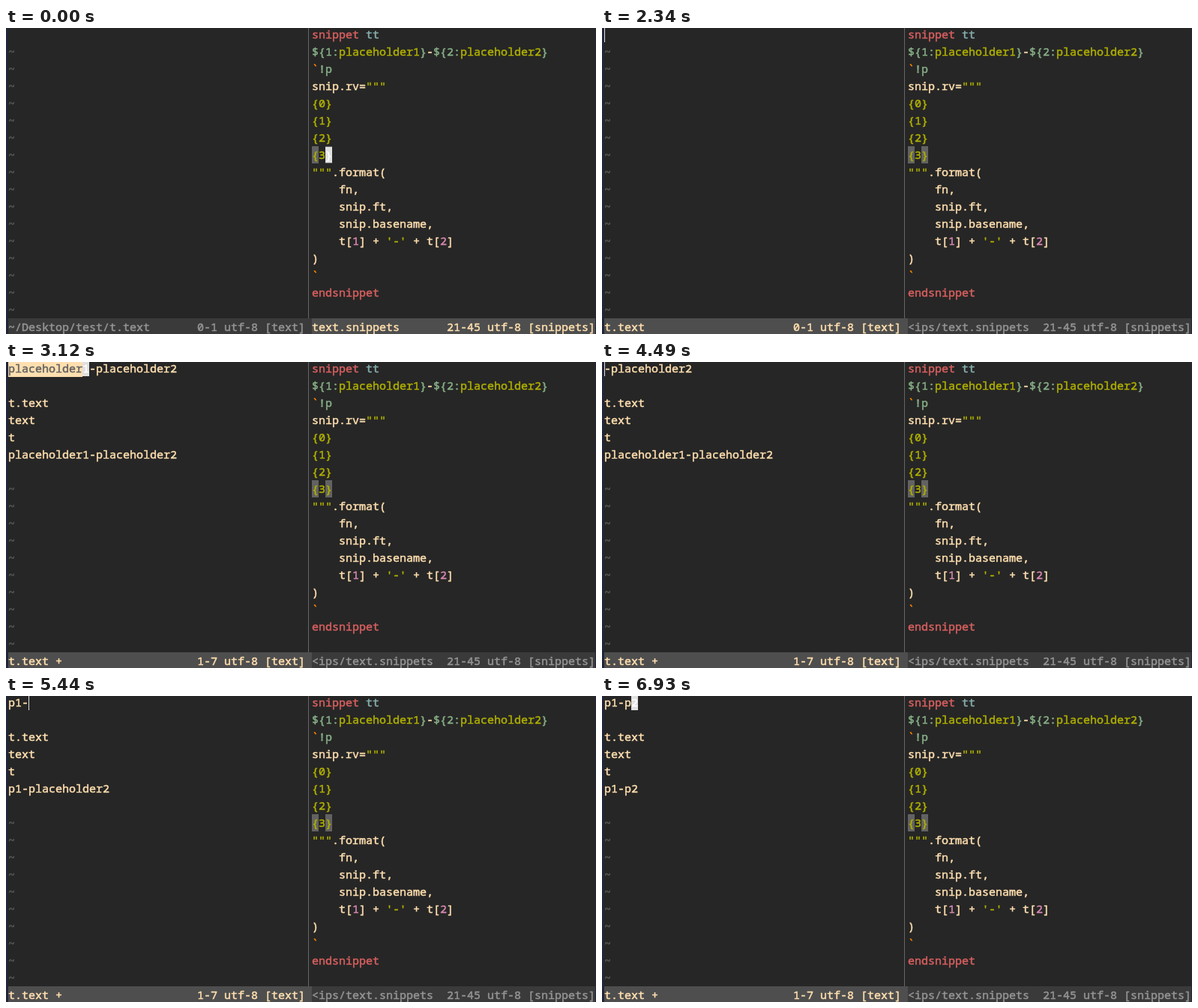
An HTML page with a canvas that plays this animation: 787 by 409 pixels, repeating every 8 s.

```html
<!DOCTYPE html>
<html lang="en">
<head>
<meta charset="utf-8">
<title>Snippet expansion in an editor</title>
<style>
  html, body { margin: 0; width: 100%; height: 100%; overflow: hidden; background: #262626; }
  canvas { display: block; }
</style>
</head>
<body>
<canvas id="screen" width="787" height="409"></canvas>
<script>
const ctx = document.getElementById('screen').getContext('2d');
const LOOP = 8000, CW = 9, RH = 23, LEFT = 3, RIGHT = 408, STATUS = 17;
const C = {
  edge: '#22263a', bg: '#262626', fg: '#ffdfaf', red: '#d75f5f', green: '#afaf00',
  aqua: '#87af87', blue: '#87afaf', orange: '#ff8700', purple: '#d787af', tilde: '#585858',
  split: '#666666', paren: '#626262', bar: '#4e4e4e', barOff: '#3a3a3a',
  textOff: '#949494', cursor: '#e0e0e0', onCursor: '#ffffff'
};

// Each line is a list of colour, text pairs.
const code = [
  ['red', 'snippet', 'blue', ' tt'],
  ['aqua', '${1:', 'green', 'placeholder1', 'aqua', '}', 'fg', '-',
   'aqua', '${2:', 'green', 'placeholder2', 'aqua', '}'],
  ['orange', '`', 'aqua', '!p'],
  ['fg', 'snip.rv=', 'green', '"""'],
  ['green', '{0}'], ['green', '{1}'], ['green', '{2}'], ['green', '{3}'],
  ['green', '"""', 'fg', '.format('],
  ['fg', '    fn,'], ['fg', '    snip.ft,'], ['fg', '    snip.basename,'],
  ['fg', '    t[', 'purple', '1', 'fg', '] + ', 'green', "'-'", 'fg', ' + t[',
   'purple', '2', 'fg', ']'],
  ['fg', ')'], ['orange', '`'], ['red', 'endsnippet']
];

const P1 = 'placeholder1', P2 = 'placeholder2';
// Each step overrides the state left by the steps before it.
const steps = [
  { at: 0, line: '', mirror: null, file: '~/Desktop/test/t.text', pos: '0-1', focus: false },
  { at: 720, focus: true, file: 't.text', col: 0, block: true, sel: null },
  { at: 2340, block: false },
  { at: 2640, line: 't', col: 1, file: 't.text +', pos: '1-1' },
  { at: 2820, line: 'tt', col: 2 },
  { at: 3120, line: P1 + '-' + P2, mirror: P1 + '-' + P2, pos: '1-7', sel: [0, 11], col: 11, block: true },
  { at: 4490, line: '-' + P2, sel: null, col: 0, block: false },
  { at: 4550, line: 'p-' + P2, col: 1 },
  { at: 4660, line: 'p1-' + P2, mirror: 'p1-' + P2, col: 2 },
  { at: 4960, sel: [3, 14], col: 14, block: true },
  { at: 5440, line: 'p1-', sel: null, col: 3, block: false },
  { at: 5500, line: 'p1-p', col: 4 },
  { at: 5730, line: 'p1-p2', mirror: 'p1-p2', col: 5 },
  { at: 6870, block: true },
  { at: 6930, col: 4 }
];

const stateAt = t => Object.assign({}, ...steps.filter(s => s.at <= t));

function rect(x, y, w, h, color) {
  ctx.fillStyle = color;
  ctx.fillRect(x, y, w, h);
}

// A thin outline gives the semibold weight.
function text(x0, row, col, str, color = C.fg) {
  const x = x0 + col * CW, y = row * RH + 14;
  ctx.fillStyle = ctx.strokeStyle = color;
  ctx.fillText(str, x, y);
  ctx.strokeText(str, x, y);
}

function cells(x0, row, col, n, color) {
  rect(x0 + col * CW, row * RH - 3, n * CW, RH, color);
}

function block(x0, row, col, ch, under) {
  cells(x0, row, col, 1, under);
  rect(x0 + col * CW, row * RH - 2, CW, RH - 2, C.cursor);
  text(x0, row, col, ch, C.onCursor);
}

function statusBar(x0, width, active, file, info, infoCol) {
  rect(x0, STATUS * RH - 3, width, RH, active ? C.bar : C.barOff);
  const color = active ? C.fg : C.textOff;
  text(x0, STATUS, 0, file, color);
  text(x0, STATUS, infoCol, info, color);
}

function drawCode(s) {
  cells(RIGHT, 7, 0, 1, C.paren);
  cells(RIGHT, 7, 2, 1, C.paren);
  code.forEach((line, row) => {
    let col = 0;
    for (let i = 0; i < line.length; i += 2) {
      text(RIGHT, row, col, line[i + 1], C[line[i]]);
      col += line[i + 1].length;
    }
  });
  if (!s.focus) block(RIGHT, 7, 2, '}', C.paren);
  statusBar(RIGHT, 378, !s.focus, s.focus ? '<ips/text.snippets' : 'text.snippets',
    '21-45 utf-8 [snippets]', 20);
}

function drawBuffer(s) {
  text(LEFT, 0, 0, s.line);
  const expanded = s.mirror !== null;
  if (expanded) ['t.text', 'text', 't', s.mirror].forEach((l, i) => text(LEFT, i + 2, 0, l));
  for (let row = expanded ? 7 : 1; row < STATUS; row++) text(LEFT, row, 0, '~', C.tilde);
  if (s.sel) {
    const [a, b] = s.sel;
    cells(LEFT, 0, a, b - a, C.fg);
    text(LEFT, 0, a, s.line.slice(a, b), C.paren);
  }
  if (s.focus) {
    if (s.block) block(LEFT, 0, s.col, s.line[s.col] || '', C.bg);
    else rect(LEFT + s.col * CW, 0, 1, 19, C.cursor);
  }
  statusBar(LEFT, RIGHT - LEFT, s.focus, s.file, s.pos + ' utf-8 [text]', 28);
}

function draw(t) {
  const s = stateAt(t);
  rect(0, 0, 787, 409, C.edge);
  rect(LEFT, 0, 783, 409, C.bg);
  ctx.font = '500 15px "Noto Sans Mono", "DejaVu Sans Mono", monospace';
  ctx.lineWidth = 0.5;
  ctx.lineJoin = 'round';
  rect(403, 0, 1, 388, C.split);
  drawCode(s);
  drawBuffer(s);
}

const start = performance.now();
function tick() {
  draw((performance.now() - start) % LOOP);
  requestAnimationFrame(tick);
}
tick();
</script>
</body>
</html>
```
